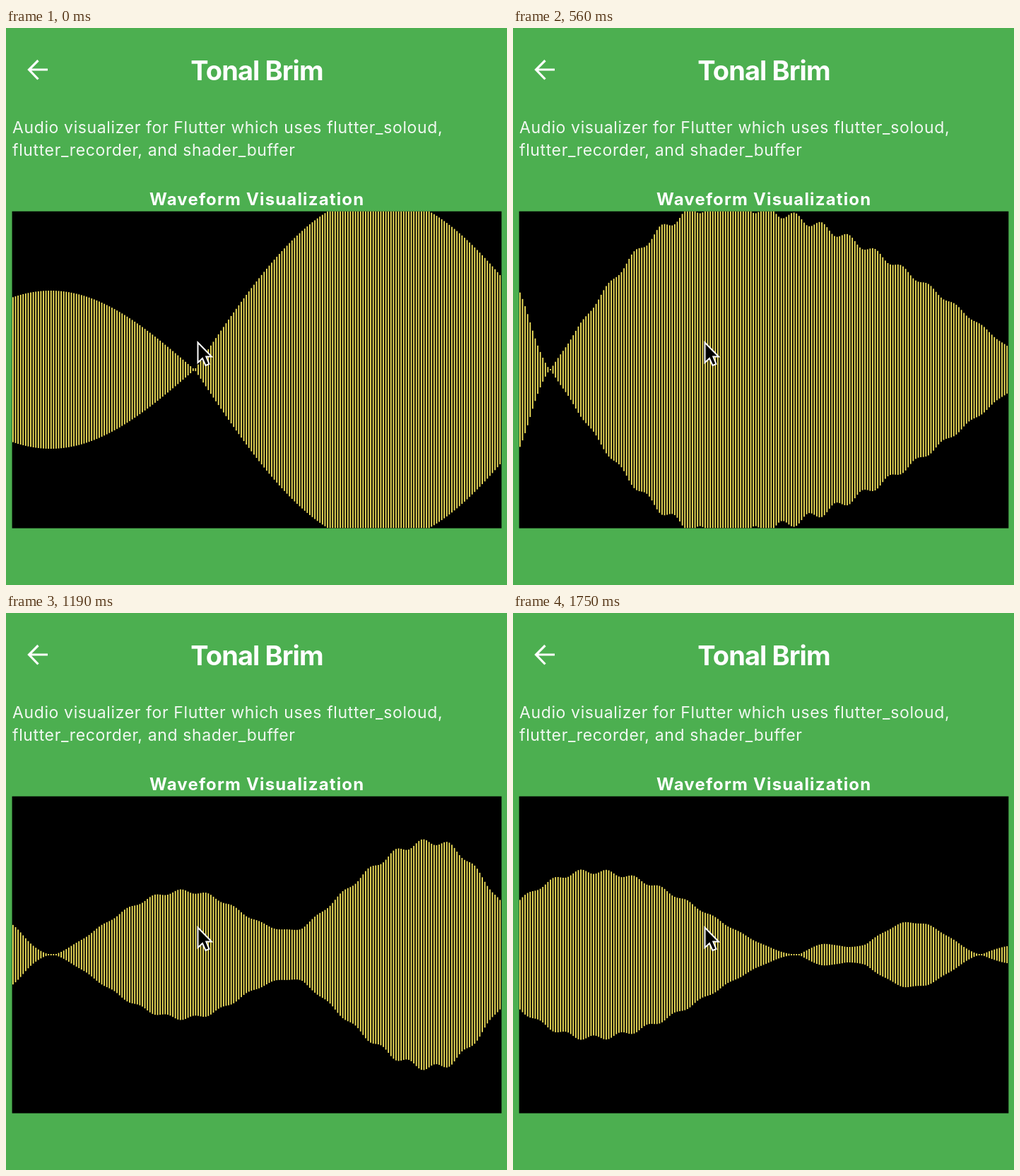
Write an HTML page with a canvas that moves like this. It is 709x789 px and loops after 1.82 s.

```html
<!DOCTYPE html>
<html lang="en">
<head>
<meta charset="utf-8">
<title>Waveform Visualization</title>
<style>
  html, body { margin: 0; width: 100%; height: 100%; overflow: hidden; background: #4caf50; }
  canvas, svg { position: absolute; left: 0; top: 0; width: 709px; height: 789px; }
  text { font-family: Inter, "Open Sans", sans-serif; fill: #fff; white-space: pre; }
  .title { font-size: 38px; font-weight: 700; letter-spacing: -0.9px; }
  .body { font-size: 23px; letter-spacing: 0.62px; fill: #f1f8f1; }
  .label { font-size: 24px; font-weight: 700; letter-spacing: 1.15px; }
</style>
</head>
<body>
<canvas width="709" height="789"></canvas>
<svg viewBox="0 0 709 789">
  <path d="M59 59H33M45.5 46L32.5 59L45.5 72.5" fill="none" stroke="#fff" stroke-width="3.2"/>
  <text class="title" x="355" y="73.5" text-anchor="middle">Tonal Brim</text>
  <text class="body" x="9" y="149">Audio visualizer for Flutter which uses flutter_soloud,</text>
  <text class="body" x="9" y="181">flutter_recorder, and shader_buffer</text>
  <text class="label" x="203" y="251">Waveform Visualization</text>
  <path d="M271.5 445.5V474L278 468L282.5 478L287.5 476L283.3 465.5H291Z" fill="#000" stroke="#fff" stroke-width="2"/>
</svg>
<script>
const STEP = 70, STEPS = 26;
const LEFT = 9, RIGHT = 701, TOP = 260, HEIGHT = 448.5, MID = 484;
const PITCH = 3.59, BAR = 1.8;
const RIPPLE_LENGTH = 38, RIPPLE_CREST = 247;
const ctx = document.querySelector('canvas').getContext('2d');

// Two quarter sines: up from one pinch to the peak, down to the next pinch.
const lobe = (from, peak, to, height, power = 1) => x => {
  const t = x < peak ? (x - from) / (peak - from) : (to - x) / (to - peak);
  return t > 0 ? height * Math.sin(t * Math.PI / 2) ** power : 0;
};

const sound = (step, ripple, ...lobes) => ({
  step,
  wave: x => lobes.reduce((sum, f) => sum + f(x), 0)
    * (1 + ripple * Math.cos(2 * Math.PI * (x - RIPPLE_CREST) / RIPPLE_LENGTH))
});

// The sign of a lobe's height only matters where two sounds blend.
const sounds = [
  sound(0, 0, lobe(-140, 63, 267, 112), lobe(267, 525, 800, -246)),
  sound(3, 0, lobe(-25, 283, 572, 240, 1.2), lobe(572, 872, 1172, -200)),
  sound(8, 0.03, lobe(-147, -47, 53, 210, 1.4), lobe(53, 292, 740, -232)),
  sound(12, 0, lobe(-120, 15, 157, 70), lobe(157, 210, 241, -23),
    lobe(241, 355, 439, 42, 1.2), lobe(439, 600, 785, -121, 1.2)),
  sound(17, 0.03, lobe(-127, -30, 67, 66, 2), lobe(67, 253, 420, -90, 1.3),
    lobe(320, 605, 795, -160, 2.2)),
  sound(22, 0.05, lobe(-60, 9, 85, 107, 1.6), lobe(85, 310, 500, -168),
    lobe(425, 570, 775, -158, 1.2)),
  sound(25, 0.03, lobe(-110, 110, 400, 118, 1.5), lobe(405, 443, 500, -15),
    lobe(470, 565, 663, -46, 1.5), lobe(663, 705, 760, 12))
];

// Between two sounds the waves slide, swell and cross over.
function waveAt(step) {
  const i = sounds.findLastIndex(s => s.step <= step);
  const from = sounds[i], to = sounds[i + 1];
  if (!to || from.step === step) return from.wave;
  const u = (step - from.step) / (to.step - from.step);
  const gain = 1 + 0.5 * Math.sin(Math.PI * u);
  return x => gain * ((1 - u) * from.wave(x + 120 * u) + u * to.wave(x - 120 * (1 - u)));
}

function draw(step) {
  const wave = waveAt(step);
  ctx.clearRect(0, 0, 709, 789);
  ctx.fillStyle = '#000';
  ctx.fillRect(LEFT - 0.4, TOP - 0.3, RIGHT - LEFT + 0.7, HEIGHT + 0.4);
  ctx.fillStyle = '#f6e55c';
  for (let x = LEFT; x < RIGHT; x += PITCH) {
    const h = Math.min(HEIGHT / 2, Math.max(1, Math.abs(wave(x + BAR / 2))));
    ctx.fillRect(x, MID - h, Math.min(BAR, RIGHT - x), 2 * h);
  }
}

const start = performance.now();
let shown = -1;
function tick() {
  const step = Math.floor((performance.now() - start) / STEP) % STEPS;
  if (step !== shown) draw(shown = step);
  requestAnimationFrame(tick);
}
tick();
</script>
</body>
</html>
```
